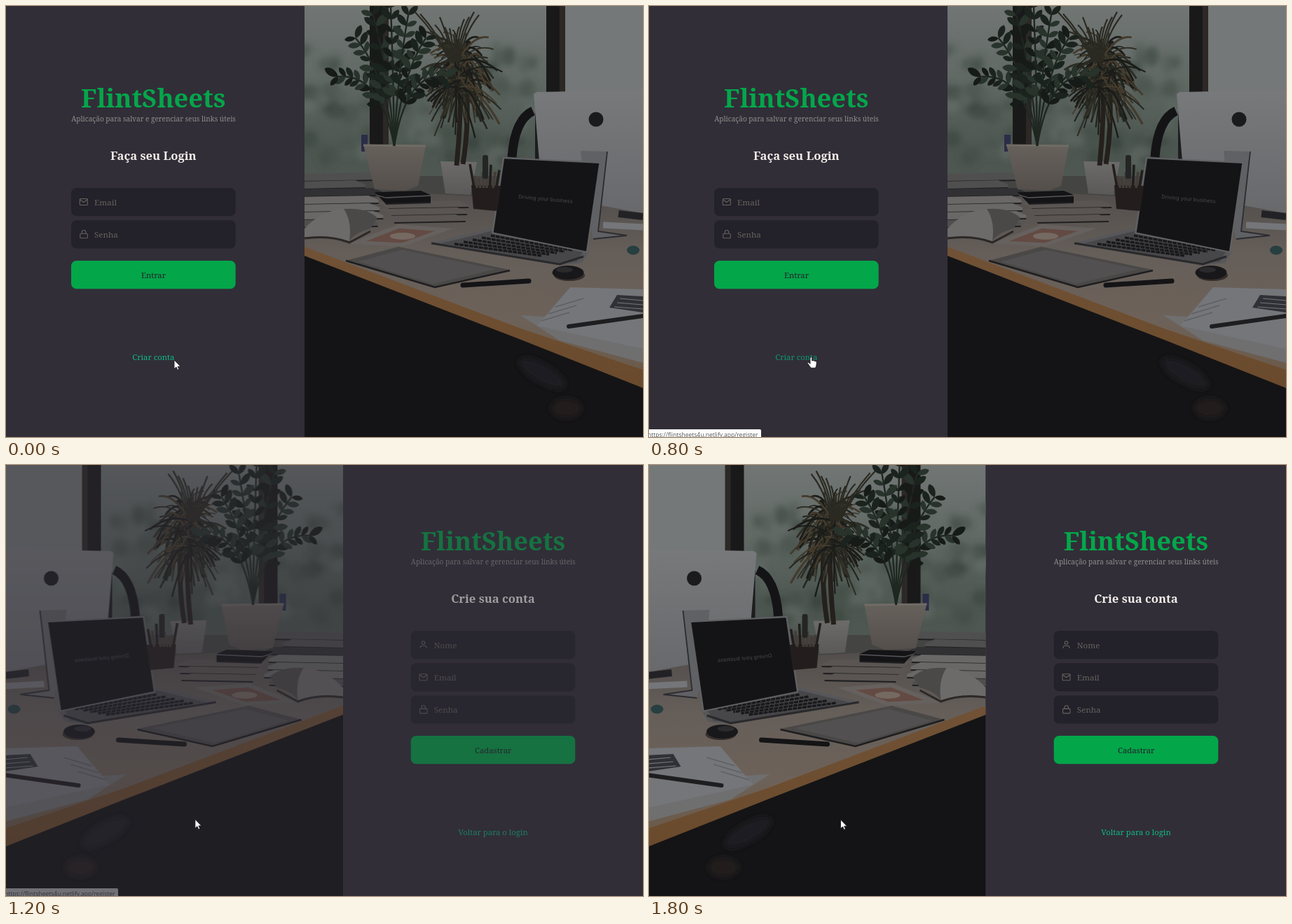
An HTML page that plays this animation: 909x616 px, repeating every 2.2 s.

```html
<!DOCTYPE html>
<html lang="pt">
<head>
<meta charset="utf-8">
<title>FlintSheets</title>
<style>
html, body { margin: 0; width: 100%; height: 100%; overflow: hidden; background: #312e38; }
svg { display: block; width: 909px; height: 616px; font-family: "Noto Serif", serif; }
</style>
</head>
<body>
<svg id="stage" viewBox="0 0 909 616" xmlns="http://www.w3.org/2000/svg"></svg>
<script>
const BG = '#312e38', GREEN = '#04a64a', LINK = '#10b981', GREY = '#666360';
const INK = '#141416', DARK = '#1e1d1f', STEEL = '#606164', PAPER = '#74767a';

let seed = 11;
function rnd(a, b) {
  seed = (seed * 16807) % 2147483647;
  return a + (b - a) * seed / 2147483647;
}
const pick = list => list[Math.floor(rnd(0, list.length))];
const repeat = (n, f) => Array.from({ length: n }, (_, i) => f(i)).join('');
const poly = (pts, fill, extra = '') => `<polygon points="${pts}" fill="${fill}" ${extra}/>`;
const rect = (x, y, w, h, fill, extra = '') =>
  `<rect x="${x}" y="${y}" width="${w}" height="${h}" fill="${fill}" ${extra}/>`;
const oval = (x, y, rx, ry, fill, extra = '') =>
  `<ellipse cx="${x}" cy="${y}" rx="${rx}" ry="${ry}" fill="${fill}" ${extra}/>`;
const line = (d, color, w, extra = '') =>
  `<path d="${d}" fill="none" stroke="${color}" stroke-width="${w}" ${extra}/>`;
const text = (x, y, size, fill, s, extra = '') =>
  `<text x="${x}" y="${y}" font-size="${size}" fill="${fill}" ${extra}>${s}</text>`;
const grad = (id, colors) => `<linearGradient id="${id}" x1="0" y1="0" x2="0" y2="1">` +
  colors.map((c, i) => `<stop offset="${i / (colors.length - 1)}" stop-color="${c}"/>`).join('') +
  '</linearGradient>';

// A polygon with a smaller copy of itself inside
function panel(pts, rim, face, k) {
  const p = pts.split(' ').map(s => s.split(',').map(Number));
  const mid = j => p.reduce((sum, q) => sum + q[j], 0) / p.length;
  const [mx, my] = [mid(0), mid(1)];
  return poly(pts, rim) + poly(p.map(([x, y]) => [mx + (x - mx) * k, my + (y - my) * k]).join(' '), face);
}

// A lying book: cover, page edge and shadow
const book = (x, y, w, h, fill) =>
  poly(`${x},${y} ${x + w - 14},${y - 2} ${x + w},${y + 4} ${x + w},${y + h} ${x + 16},${y + h + 2}`, fill) +
  line(`M${x + 16} ${y + h + 2}L${x + w} ${y + h}`, '#202022', 2.2);

/* ---- office scene ---- */
function view() {
  const blobs = repeat(90, () => oval(rnd(426, 770), rnd(60, 225), rnd(6, 20), rnd(5, 15),
    pick(['#38423c', '#444f48', '#525d56', '#636c67']), 'opacity=".6"'));
  return rect(426, 0, 483, 300, 'url(#sky)') + `<g filter="url(#soft)">${blobs}</g>` +
    rect(795, 0, 114, 130, '#757879') +
    [[519, 200], [771, 126]].map(([x, h]) => rect(x, 0, 25, h, '#1a191a') + rect(x + 19, 0, 8, h, '#2c2826')).join('') +
    rect(426, 243, 483, 50, '#444543');
}

function desk() {
  return poly('426,258 909,286 909,545 426,358', 'url(#wood)') +
    poly('426,344 735,461 909,520 909,547 735,478 426,358', 'url(#edge)') +
    poly('426,357 735,477 909,546 909,616 426,616', INK) +
    `<g filter="url(#soft)">${oval(765, 525, 38, 14, '#1e1e21', 'transform="rotate(30 765 525)"')}` +
    oval(800, 575, 22, 14, '#211f1f') + '</g>';
}

const leaf = (x, y, deg, len) =>
  `<path transform="translate(${x} ${y}) rotate(${deg}) scale(${len})" fill="${pick(['#161b18', '#1b231e', '#27332b'])}"
    d="M0 0C.3 -.3 .8 -.3 1 0C.8 .3 .3 .3 0 0"/>`;

// A curved stem with leaves in pairs along it
function stem(ex, ey) {
  const x0 = 554, y0 = 200, cx = x0 + (ex - x0) * .25, cy = 95;
  return line(`M${x0} ${y0}Q${cx} ${cy} ${ex} ${ey}`, '#1f2721', 2.4) + repeat(8, i => {
    const t = .35 + .65 * i / 7, u = 1 - t;
    const x = u * u * x0 + 2 * u * t * cx + t * t * ex;
    const y = u * u * y0 + 2 * u * t * cy + t * t * ey;
    const a = Math.atan2(u * (cy - y0) + t * (ey - cy), u * (cx - x0) + t * (ex - cx)) * 180 / Math.PI;
    return leaf(x, y, a - rnd(35, 65), rnd(15, 23)) + leaf(x, y, a + rnd(35, 65), rnd(15, 23));
  });
}

const spikes = () => line('M648 95Q650 160 643 228M656 100Q662 165 652 226', '#25201c', 7) +
  repeat(190, i => {
    const a = rnd(0, 2 * Math.PI), r = rnd(25, 80);
    const x = 650 + rnd(-9, 9), y = rnd(62, 125);
    const ex = x + r * Math.cos(a) * .8, ey = y + r * Math.sin(a) * .75 + 18;
    return line(`M${x} ${y}Q${(x + ex) / 2} ${(y + ey) / 2 - 18} ${ex} ${ey}`,
      pick(['#1b1c19', '#24251f', '#2f2e25', '#443b2d']), rnd(1.2, 3.2));
  }) +
  repeat(14, i => line(`M${634 + i} 80Q${614 + i * 3} 40 ${584 + i * 7} ${rnd(8, 40)}`, '#2b2a22', 2.2));

function plants() {
  return poly('620,222 672,223 663,270 627,268', 'url(#pale)') + spikes() +
    rect(507, 184, 9, 24, '#2b2d48') +
    poly('510,198 599,199 588,257 570,264 526,262', 'url(#clay)') +
    line('M510 199L599 200', '#716b65', 3) +
    repeat(7, i => stem(474 + 25 * i, 2 + 11 * (i - 3) ** 2)) +
    poly('664,256 706,257 701,293 667,290', '#231e1d') +
    repeat(8, i => line(`M${668 + i * 4.5} 260L${662 + i * 6} ${rnd(226, 246)}`, pick(['#211e1c', '#443c37']), 3.5)) +
    rect(680, 213, 8, 34, '#242525', 'rx="3"');
}

function books() {
  return repeat(7, i => book(410, 240 + i * 11, rnd(100, 130), 9, pick(['#313133', '#504f4f', '#696866']))) +
    repeat(3, i => book(530 + i * 4, 280 + i * 10, 130 - i * 6, 8, pick(['#68625e', '#5a5552']))) +
    book(526, 266, 80, 15, INK) + line('M528 270L542 274L606 271', '#57565a', 1.3) +
    panel('488,340 560,312 638,318 566,344', '#66615e', '#634a42', .65) +
    oval(566, 329, 18, 5, '#756a61') +
    `<path fill="#6d6b6a" d="M426 318Q450 292 482 290Q512 290 528 304Q505 316 490 336Q460 326 426 331Z"/>` +
    `<path fill="#4b4948" d="M482 290Q515 288 530 303L520 318Q498 324 490 336Q494 308 482 290Z"/>` +
    line('M426 332Q462 327 490 338L520 322', '#2b2827', 3);
}

function computers() {
  return line('M752 150Q726 162 722 216', INK, 13) + line('M765 150V225', '#1d1d1f', 20) +
    poly('753,126 757,123 909,120 909,296 765,270', 'url(#shell)') +
    oval(842, 162, 10.5, 10.5, '#1b1b1e') +
    poly('820,207 858,208 846,322 886,328 838,333 830,300', STEEL) +
    line('M858 208L845 322L886 328L838 333', '#2c2c30', 1.8) +
    line('M874 297L909 301', '#222226', 10) + line('M852 313L909 316', PAPER, 9) +
    panel('607,338 694,317 832,350 822,367 790,371', '#57575a', '#47474a', .9) +
    line('M607 339L790 369L824 358', '#29282b', 3) +
    repeat(5, i => line(`M${640 + i * 13} ${340 - i * 3}L${764 + i * 11} ${357 - i * 2}`, '#19191c', 3.4,
      'stroke-dasharray="6 1"')) +
    panel('709,216 849,223 830,353 693,325', STEEL, INK, .965) +
    `<g transform="rotate(5 731 275)">` +
    text(731, 275, 7.6, '#48484c', 'Driving your business', 'font-family="Inter, sans-serif"') + '</g>';
}

function deskTop() {
  const round = 'stroke-linecap="round"';
  return panel('485,364 560,344 719,377 612,402', '#4a4847', '#525050', .84) +
    line('M485 364L612 402L719 378', DARK, 2.5) +
    line('M652 399L746 393', INK, 7, round) +
    oval(804, 385, 22, 8, '#37302c') + oval(802, 381, 22.5, 10, '#18181b') + oval(797, 377, 12, 4, '#2a2a2d') +
    oval(895, 349, 9, 6.5, '#273f40') +
    poly('734,442 800,446 909,470 909,510 790,478', '#6f6f70') +
    poly('758,457 805,402 909,405 909,490', PAPER) +
    repeat(3, i => line(`M${764 + i * 10} ${450 - i * 10}l40 -12`, '#5f6063', 1.6)) +
    poly('872,413 909,415 909,438 861,431', '#303136') +
    repeat(3, i => line(`M${876 - i * 4} ${418 + i * 6}L909 ${421 + i * 6}`, PAPER, 1.2)) +
    line('M803 458L909 443', DARK, 6, round);
}

const scene = () => view() + desk() + computers() + books() + plants() + deskTop();

/* ---- form pages ---- */
const icons = {
  Email: `<rect x="0" y="1.5" width="11" height="9" rx="1"/><path d="M0 2.5L5.5 6.5L11 2.5"/>`,
  Senha: `<rect x=".5" y="5" width="10.5" height="6.5" rx="1"/><path d="M3 5V3A2.6 2.6 0 0 1 8.4 3V5"/>`,
  Nome: `<circle cx="5.5" cy="3" r="2.3"/><path d="M1 11V10Q1 7.5 3.3 7.5H7.7Q10 7.5 10 10V11"/>`
};
const box = (y, fill) => rect(93, y, 234.6, 40.2, fill, 'rx="7.5"');

const field = (name, y) => box(y, '#232129') +
  `<g transform="translate(105.3 ${y + 14})" fill="none" stroke="${GREY}" stroke-width="1.1">${icons[name]}</g>` +
  text(126, y + 25, 11.6, GREY, name);

function form(dx, dy, heading, fields, action, link, id) {
  const mid = 'text-anchor="middle"', bold = mid + ' font-weight="700"';
  const y = 364 + dy + 46 * (fields.length - 2);
  return `<g transform="translate(${dx} 0)">` +
    text(210.3, 145 + dy, 36.3, GREEN, 'FlintSheets', bold) +
    text(210.5, 165 + dy, 10.05, '#918e8b', 'Aplicação para salvar e gerenciar seus links úteis', mid) +
    text(210.3, 220 + dy, 16.6, '#f4ede8', heading, bold) +
    fields.map((f, i) => field(f, 260 + dy + 46.2 * i)).join('') +
    box(y, GREEN) +
    text(210.5, y + 25, 11.25, '#232129', action, mid) +
    text(210.3, y + 142, 11.25, LINK, link, `${mid} id="${id}"`) + '</g>';
}

const $ = id => document.getElementById(id);
$('stage').innerHTML = `<defs>
  <filter id="soft"><feGaussianBlur stdDeviation="4"/></filter>
  <clipPath id="frame"><rect x="426" y="0" width="483" height="616"/></clipPath>
  ${grad('sky', ['#717675', '#626a66', '#4c5650', '#525853'])}
  ${grad('shell', ['#77797b', '#68696c'])}
  ${grad('clay', ['#67615c', '#544f4b'])}
  ${grad('pale', ['#6c6b6a', '#5a5958'])}
  ${grad('wood', ['#504c4a', '#655e59', '#6d6259', '#6b5845'])}
  ${grad('edge', ['#715236', '#6a4a2c'])}
  <g id="photo" clip-path="url(#frame)">${scene()}</g></defs>
  ${rect(0, 0, 909, 616, BG)}
  <g id="login"><use href="#photo"/>
    ${form(0, 0, 'Faça seu Login', ['Email', 'Senha'], 'Entrar', 'Criar conta', 'create')}</g>
  <g id="register"><use href="#photo" transform="translate(906.5 0) scale(-1 1)"/>
    ${form(484.7, -23, 'Crie sua conta', ['Nome', 'Email', 'Senha'], 'Cadastrar', 'Voltar para o login', 'back')}</g>
  <g id="status">${rect(-4, 605, 164, 15, '#fff', 'rx="2"')}
    ${text(155.5, 616, 8.5, '#55565a', 'https://flintsheets4u.netlify.app/register',
      'text-anchor="end" font-family="Open Sans, sans-serif"')}</g>
  <path id="arrow" d="M0 0V12.6L3 9.9L4.9 14.2L6.9 13.3L5 9.2H9Z" fill="#fff" stroke="#1b1a20" stroke-width=".8"/>
  <path id="hand" fill="#fff" stroke="#1b1a20" stroke-width=".8" d="M0 1.2Q1.4-.6 2.6 1.2V5.6L4.6 5.2L6.6 6
    L8.4 6.4Q9.3 6.8 9.2 8.5L8.8 12L7.6 15.8H1.2L-1.6 12L-3.8 8.8Q-3.4 7-1.6 8.4L0 10Z"/>`;

/* ---- motion ---- */
// Progress from t0 over d ms, slowing towards the end
function ease(t, t0, d, power = 1) {
  const p = Math.min(1, Math.max(0, (t - t0) / d));
  return 1 - (1 - p) ** power;
}
const show = (id, on) => $(id).setAttribute('visibility', on ? 'visible' : 'hidden');

function draw(ms) {
  const t = Math.floor(ms % 2200 / 100) * 100;
  const next = t >= 900, hover = t >= 100 && !next;
  show('login', !next);
  show('register', next);
  show('hand', hover);
  show('arrow', !hover);
  $('register').setAttribute('opacity', ease(t, 800, 1000, 1.7));
  $('status').setAttribute('opacity', ease(t, 200, 200) - ease(t, 1030, 270));
  $('create').setAttribute('fill', hover ? '#0d996d' : LINK);
  const onto = ease(t, 0, 200), away = ease(t, 900, 400, 1.8);
  const at = `translate(${240 - 10 * onto + 43.5 * away} ${506 - 4.5 * onto + 5.5 * away})`;
  $('arrow').setAttribute('transform', at);
  $('hand').setAttribute('transform', at);
}

const start = performance.now();
function tick() {
  draw(performance.now() - start);
  requestAnimationFrame(tick);
}
tick();
</script>
</body>
</html>
```
